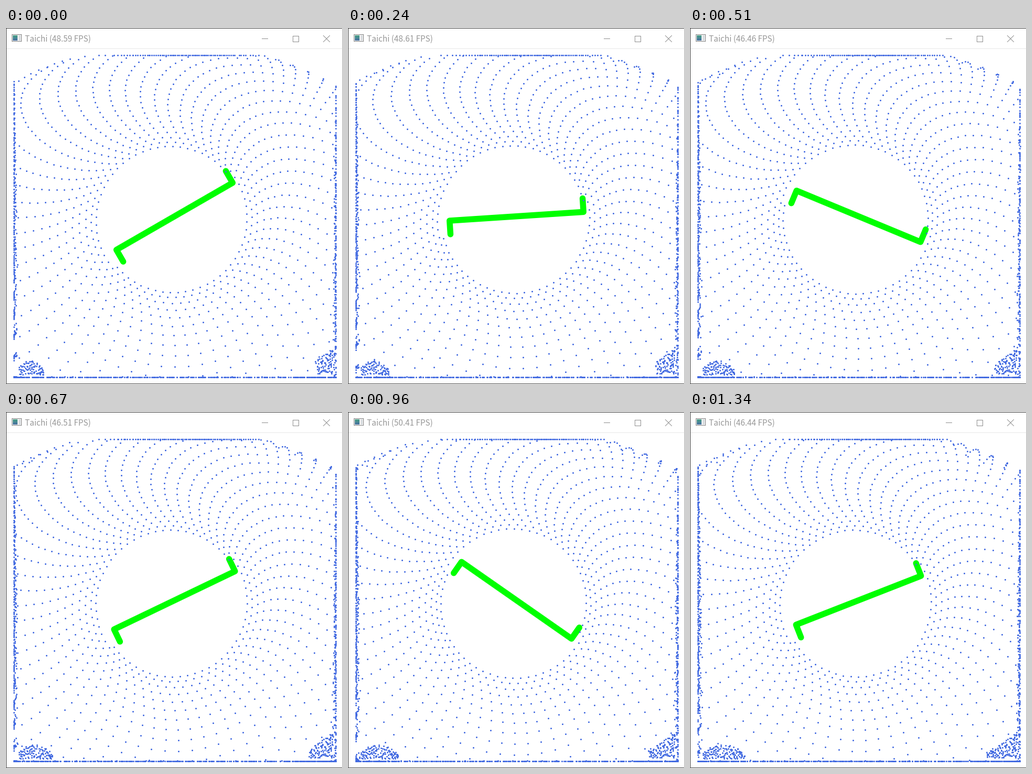
Recreate the animation shown at these times as a matplotlib script. Size 641 by 680 pixels, loop 1.37 s.

```python
import numpy as np
import matplotlib.pyplot as plt
from matplotlib.animation import FuncAnimation
from matplotlib.patches import Rectangle

W, H, DPI = 641, 680, 100
LOOP, TICK, SHOTS = 1370, 10, 51
PX = 72 / DPI                     # points per pixel

# Sprinkler: turns 0.1 rad per step, two opposite nozzles
SPIN = 0.1
HALF = np.pi / SPIN               # steps per half turn
HUB = np.array([321, 359.2])
ARM, NOZZLE = 128, 26
START = np.radians(30)
TIP = np.arctan2(NOZZLE, ARM)

# Water, in pixels per half turn
SOURCE, RADIUS = np.array([315.0, 365.0]), 138
OUT, SIDE, GRAVITY = 7.3 / HALF, 17 / HALF, 0.63 / HALF**2
LOW, HIGH = np.array([14, 51]), np.array([629, 666])
WARMUP = 1050

# Moments when a new picture appears, and the simulation step it shows
starts = 10 * np.floor((np.arange(SHOTS) * LOOP / SHOTS + 2.9) / 10)
steps = np.rint(np.interp(np.arange(SHOTS), [0, 9, 19, 25, 36, 42, 50],
                          [0, 36, 72, 95, 137, 161, 190])).astype(int)
RATES = [48.59, 48.61, 46.46, 46.51, 50.41, 50.06, 46.44]


def axes_at(angle):
    """Unit vectors along an angle and a quarter turn anticlockwise of it."""
    c, s = np.cos(angle), np.sin(angle)
    return np.array([c, -s]), np.array([-s, -c])


def simulate():
    rng = np.random.default_rng(4)
    pos, vel = np.empty((0, 2)), np.empty((0, 2))
    wanted, shots = set(steps.tolist()), {}
    for step in range(-WARMUP, steps[-1] + 1):
        vel[:, 1] += GRAVITY
        vel[pos[:, 1] <= LOW[1]] = 0          # drops stick to the ceiling
        pos += vel
        hit = (pos < LOW) | (pos > HIGH)
        pos = np.clip(pos, LOW, HIGH)
        vel = np.where(hit, -vel * 0.02 * rng.random(vel.shape), vel)
        vel[hit[:, 0], 1] *= 0.6              # walls slow the drops down

        for turn in (0, np.pi):
            along, across = axes_at(START + TIP - SPIN * step + turn)
            pos = np.vstack([pos, SOURCE + RADIUS * along])
            vel = np.vstack([vel, OUT * along + SIDE * across])
        if step in wanted:
            shots[step] = pos.copy()
    return shots


def heaps(part):
    """Corner piles that spread as part goes from 0 to 1."""
    rng = np.random.default_rng(9)
    count = 130
    n = np.arange(count)
    mix = (n * 0.618034 + rng.normal(0, 0.08, count)) % 1
    wobble = rng.normal(0, 1.5, count)

    edge = 72 + 32 * part
    x = 24 + 80 * n / count + wobble
    hump = np.sin(np.pi * np.clip((x - 16) / (edge + 4 - 16), 0, 1))
    left = np.column_stack([x, 662 - 28 * hump**0.7 * mix])[x < edge]

    q = (n / count) ** 1.4
    x = 621 - 55 * q + wobble
    y = 660 - 48 * (1 - 0.8 * q) * mix
    right = np.column_stack([x, y])[n < count * (0.65 + 0.35 * part)]

    line = np.concatenate([rng.uniform(14, 100, 40), rng.uniform(545, 629, 45)])
    base = np.column_stack([line, np.full(85, HIGH[1])])
    return np.vstack([left, right, base])


def box(x, y, w, h, color):
    ax.add_patch(Rectangle((x - 0.5, y - 0.5), w, h, fc=color, lw=0, antialiased=False))


def stroke(xs, ys, color="#8c8c8c", width=1.0):
    ax.plot(xs, ys, color=color, lw=width * PX)


def draw_window():
    box(0, 39, W, 1, "#e6e6e6")
    box(0, 0, W, 1, "#404040")
    box(0, 0, 1, H, "#404040")
    box(0, H - 1, W, 1, "#505050")
    # application icon
    box(11, 12, 19, 14, "#808080")
    box(12, 13, 17, 12, "#f6f6f6")
    for row in range(10):
        box(13, 14 + row, 9, 1, (0.28, 0.62 - 0.02 * row, 0.52 + 0.012 * row))
    box(24, 14, 4, 10, "#d9dde0")
    # caption buttons
    box(488, 20, 12, 1, "#8c8c8c")
    stroke([546, 557, 557, 546, 546], [14, 14, 25, 25, 14])
    stroke([605, 617], [14, 26])
    stroke([605, 617], [26, 14])


fig = plt.figure(figsize=(W / DPI, H / DPI), dpi=DPI, facecolor="white")
ax = fig.add_axes([0, 0, 1, 1])
ax.set_xlim(-0.5, W - 0.5)
ax.set_ylim(H - 0.5, -0.5)
ax.axis("off")
draw_window()
title = ax.text(35.5, 25, "", family="Noto Sans CJK JP", size=15.3 * PX,
                color="#999999", va="baseline")
arm, = ax.plot([], [], color="#00ff00", lw=11.5 * PX,
               solid_capstyle="round", solid_joinstyle="round")
drops, = ax.plot([], [], "o", color="#4169e1", ms=3.0 * PX, mew=0)
shots = simulate()


def update(tick):
    time = tick * TICK
    shot = np.searchsorted(starts, time, side="right") - 1
    step = steps[shot]
    along, across = axes_at(START - SPIN * step)
    end = ARM * along
    tip = end + NOZZLE * across
    arm.set_data(*(HUB + np.array([tip, end, -end, -tip])).T)
    drops.set_data(*np.vstack([shots[step], heaps(shot / (SHOTS - 1))]).T)
    rate = RATES[int((starts[shot] + 18) // 206)]
    title.set_text(f"Taichi ({rate:.2f} FPS)")
    return arm, drops, title


anim = FuncAnimation(fig, update, frames=LOOP // TICK, interval=TICK,
                     init_func=lambda: update(0), repeat=True, repeat_delay=0)
plt.show()
```
